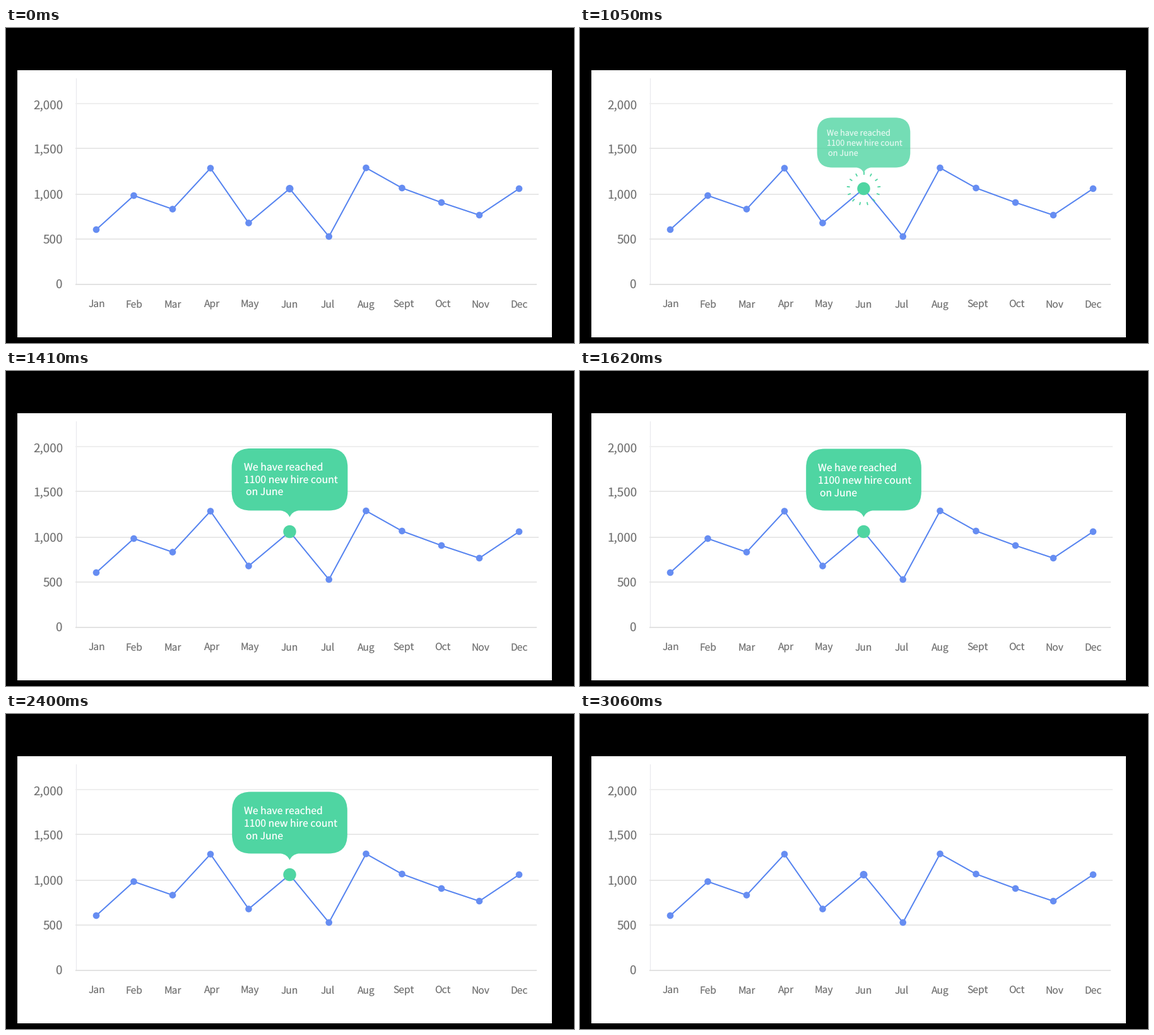
Animation, 900 px wide and 500 px high, one loop 3180 ms. Source, as a matplotlib script:

```python
import numpy as np
import matplotlib as mpl
import matplotlib.pyplot as plt
from matplotlib.animation import FuncAnimation
from matplotlib.collections import LineCollection
from matplotlib.colors import to_rgb
from matplotlib.patches import Circle, PathPatch, Rectangle
from matplotlib.path import Path
from matplotlib.transforms import Affine2D

mpl.rcParams["font.family"] = "Noto Sans CJK JP"
mpl.rcParams["text.hinting"] = "none"

W, H, DPI = 900, 500, 100
STEP, LOOP = 30, 3180
PT = 72 / DPI  # points per pixel
BLUE, LINE, GREEN, GREY = "#668df2", "#5583f0", "#4fd5a2", "#737373"
JUNE = np.array([449.5, 255.0])
ANCHOR = np.array([449.5, 221.5])  # the bubble grows from here

MONTHS = [
    ("Jan", 143, 320), ("Feb", 202.5, 266), ("Mar", 264, 287.5),
    ("Apr", 324, 222.5), ("May", 384.5, 309.5), ("Jun", 449.5, 255),
    ("Jul", 511.7, 331), ("Aug", 570.5, 222), ("Sept", 627.5, 254),
    ("Oct", 690, 277), ("Nov", 750, 297), ("Dec", 813, 255),
]
LABEL_X = [143.5, 203, 264, 326, 386, 449, 510, 570, 630.5, 691.5, 752, 813.5]
LEVELS = [("2,000", 119.5, 128, 91), ("1,500", 191, 198.5, 90.7),
          ("1,000", 263.5, 270, 90.7), ("500", 335, 341.5, 89.7),
          ("0", 407, 412.5, 88.7)]
MESSAGE = [("We have reached", 377, 159), ("1100 new hire count", 377, 178.7),
           ("on June", 380, 198.3)]

fig = plt.figure(figsize=(W / DPI, H / DPI), dpi=DPI, facecolor="black")
ax = fig.add_axes([0, 0, 1, 1])
ax.set(xlim=(0, W), ylim=(H, 0))
ax.axis("off")


def label(x, y, s, px, color, **kw):
    return ax.text(x, y, s, fontsize=px * PT, color=color, va="baseline", **kw)


def ramp(t, start, end):
    return min(max((t - start) / (end - start), 0), 1)


def smooth(t, start, end):
    u = ramp(t, start, end)
    return u * u * (3 - 2 * u)


def mix(a, b, u):
    return tuple((1 - u) * np.array(to_rgb(a)) + u * np.array(to_rgb(b)))


def bubble_path(x0, y0, x1, y1, r):
    cx = ANCHOR[0]
    M, L, Q = Path.MOVETO, Path.LINETO, Path.CURVE3
    steps = [
        (M, x0 + r, y0), (L, x1 - r, y0), (Q, x1, y0), (Q, x1, y0 + r),
        (L, x1, y1 - r), (Q, x1, y1), (Q, x1 - r, y1),
        (L, cx + 14, y1), (Q, cx + 3.5, y1 + 1.5), (Q, cx, y1 + 10.5),
        (Q, cx - 3.5, y1 + 1.5), (Q, cx - 14, y1),
        (L, x0 + r, y1), (Q, x0, y1), (Q, x0, y1 - r),
        (L, x0, y0 + r), (Q, x0, y0), (Q, x0 + r, y0),
    ]
    return Path([s[1:] for s in steps], [s[0] for s in steps])


# Chart
ax.add_patch(Rectangle((18, 67), 847, 424, fc="white", lw=0))
ax.plot([110.5, 110.5], [80, 407], color="#e9e9ee", lw=1.2 * PT)
for i, (name, y, base, right) in enumerate(LEVELS):
    shade = ["#efefef", "#e8e8e8", "#e8e8e8", "#e8e8e8", "#e2e2e2"][i]
    ax.plot([110, 844 if i < 3 else 841], [y, y], color=shade, lw=2 * PT,
            solid_capstyle="butt")
    label(right, base, name, 18.9, GREY, ha="right")

ax.plot([m[1] for m in MONTHS], [m[2] for m in MONTHS], color=LINE,
        lw=2 * PT, solid_joinstyle="round", zorder=3)
for (name, x, y), lx in zip(MONTHS, LABEL_X):
    label(lx, 443 if name == "Jan" else 443.7, name, 15.6, GREY, ha="center")
    if name != "Jun":
        ax.add_patch(Circle((x, y), 5.3, fc=BLUE, lw=0, zorder=4))

# Moving parts
ring, = ax.plot([], [], color=GREEN, lw=2 * PT, solid_capstyle="butt", zorder=5)
burst = LineCollection([], colors=GREEN, linewidths=1.8 * PT, zorder=5)
ax.add_collection(burst)
bubble = ax.add_patch(PathPatch(bubble_path(358, 123.3, 541, 221.5, 30),
                                fc=GREEN, lw=0, zorder=6))
lines = [label(x, y, s, 15.8, "white", zorder=7) for s, x, y in MESSAGE]
dot = ax.add_patch(Circle(JUNE, 6, fc=BLUE, lw=0, zorder=8))

RAYS = np.radians(90 + np.arange(13) * 360 / 13)
RAYS = np.column_stack([np.cos(RAYS), -np.sin(RAYS)])


def draw_dot(t):
    on = smooth(t, 240, 510) * (1 - smooth(t, 2850, 3060))
    size = smooth(t, 240, 840) * (1 - smooth(t, 2850, 3060))
    dot.set_radius(6 + 4.2 * size)
    dot.set_facecolor(mix(BLUE, GREEN, on))


def draw_ring(t):
    head, tail = smooth(t, 390, 755), smooth(t, 480, 825)
    ring.set_visible(head > tail)
    a = 2 * np.pi * np.linspace(tail, head, 80)
    ring.set_data(JUNE[0] + 17.2 * np.sin(a), JUNE[1] - 17.2 * np.cos(a))


def draw_burst(t):
    u = ramp(t, 900, 1380)
    burst.set_visible(0 < u < 1)
    mid = 10 + 32 * (1 - (1 - u) ** 1.6)
    half = 2.4 * min(1, 2.5 * (1 - u))
    burst.set_segments([[JUNE + (mid - half) * d, JUNE + (mid + half) * d]
                        for d in RAYS])


def bubble_scale(t):
    if t < 1160:
        return 1.025 * np.sin(np.pi / 2 * ramp(t, 900, 1160))
    if t < 2640:
        return 1.025 - 0.021 * smooth(t, 1160, 1410) - 0.006 * smooth(t, 1410, 1620)
    return 0.998 * np.cos(np.pi / 2 * ramp(t, 2640, 2900))


def draw_bubble(t):
    k = bubble_scale(t)
    alpha = ramp(t, 900, 1090) * (1 - ramp(t, 2710, 2900))
    shown = k > 0.03 and alpha > 0
    bubble.set_visible(shown)
    for text, (_, x, y) in zip(lines, MESSAGE):
        text.set_visible(shown)
        if shown:
            text.set_position(ANCHOR + k * (np.array([x, y]) - ANCHOR))
            text.set_fontsize(15.8 * k * PT)
            text.set_alpha(alpha)
    if shown:
        grow = Affine2D().translate(*-ANCHOR).scale(k).translate(*ANCHOR)
        bubble.set_transform(grow + ax.transData)
        bubble.set_alpha(alpha)


def update(i):
    t = i * STEP
    draw_dot(t)
    draw_ring(t)
    draw_burst(t)
    draw_bubble(t)
    return [ring, burst, bubble, *lines, dot]


anim = FuncAnimation(fig, update, frames=LOOP // STEP, interval=STEP,
                     repeat=True, repeat_delay=0, blit=False)
plt.show()
```
